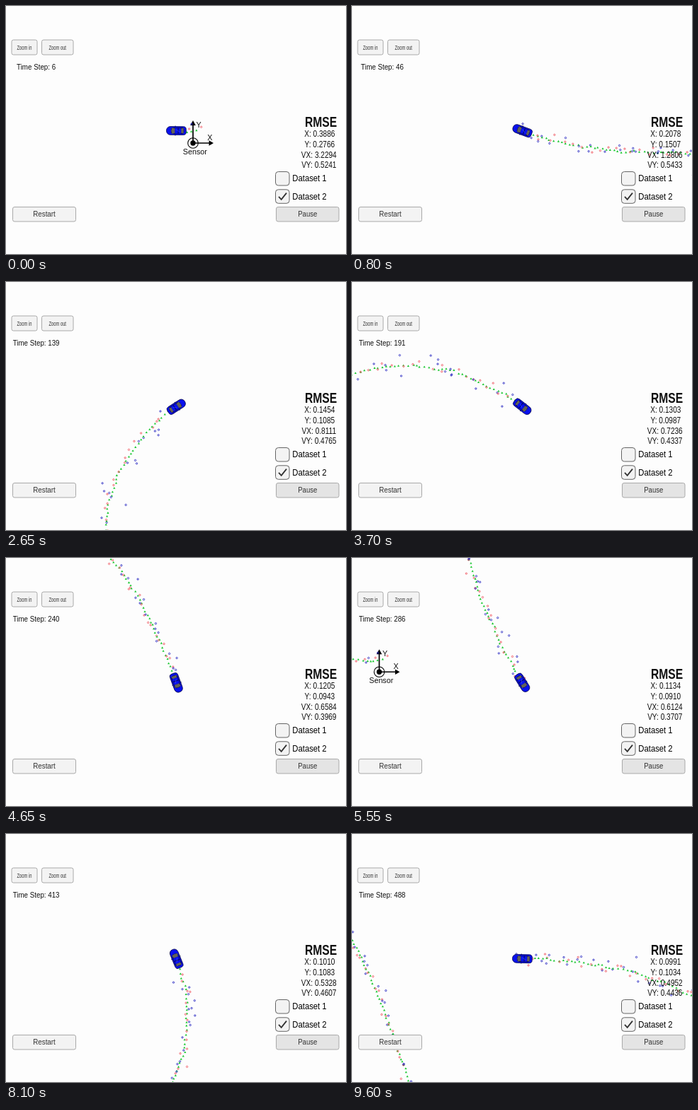
Animation of 480x351 px, one loop 9.65 s. Source, as an HTML page with a canvas:

```html
<!DOCTYPE html>
<html lang="en">
<head>
<meta charset="utf-8">
<title>Tracking simulator</title>
<style>
  html, body { margin: 0; width: 100%; height: 100%; overflow: hidden; background: #fdfdfd; }
  canvas { display: block; }
</style>
</head>
<body>
<canvas id="stage" width="480" height="351"></canvas>
<script>
const ctx = document.getElementById('stage').getContext('2d');
const TAU = Math.PI * 2;
const LOOP = 9650, TICK = 50, STEPS = 500;
const CAR = { x: 240.5, y: 176.5 };
const FONT = '"Liberation Sans", Arial, sans-serif';

// tick -> time step
const CLOCK = [[0, 6], [74, 191], [111, 286], [134, 343], [192, 488]];

// time step -> X, Y, VX, VY errors
const RMSE = [
  [6, 0.3886, 0.2766, 3.2294, 0.5241],
  [86, 0.1715, 0.1251, 0.9639, 0.5493],
  [191, 0.1303, 0.0987, 0.7236, 0.4337],
  [286, 0.1134, 0.0910, 0.6124, 0.3707],
  [343, 0.1064, 0.1011, 0.5669, 0.4220],
  [413, 0.1010, 0.1083, 0.5328, 0.4607],
  [488, 0.0991, 0.1034, 0.4952, 0.4436]
];

let seed = 20;
function random() {
  seed = (seed + 0x6D2B79F5) | 0;
  let r = Math.imul(seed ^ (seed >>> 15), 1 | seed);
  r = (r + Math.imul(r ^ (r >>> 7), 61 | r)) ^ r;
  return ((r ^ (r >>> 14)) >>> 0) / 4294967296;
}
function gauss(sigma) {
  return sigma * (random() + random() + random() + random() - 2) * 1.73;
}

function segment(table, value) {
  let i = 0;
  while (i < table.length - 2 && value >= table[i + 1][0]) i++;
  return [table[i], table[i + 1]];
}
function stepAt(tick) {
  const [a, b] = segment(CLOCK, tick);
  return Math.round(a[1] + (b[1] - a[1]) * (tick - a[0]) / (b[0] - a[0]));
}
function errorAt(step, column) {
  const [a, b] = segment(RMSE, step);
  const p = Math.log(step / a[0]) / Math.log(b[0] / a[0]);
  return a[column] * Math.pow(b[column] / a[column], p);
}

// Path around the sensor: sinusoidal turn rate and a slightly varying speed, in pixels
function buildPath() {
  const path = [];
  let x = 0, y = 0;
  for (let k = 0; k <= STEPS; k++) {
    const phase = TAU * k / STEPS;
    const heading = Math.PI - 2.188 * (1 - Math.cos(phase));
    const speed = 5.86 - 0.02 * Math.cos(phase) - 0.1 * Math.cos(2 * phase) + 0.17 * Math.sin(phase);
    path.push({ x, y, heading });
    x += speed * Math.cos(heading);
    y -= speed * Math.sin(heading);
  }
  const start = { x: path[6].x + 23.5, y: path[6].y + 17.5 };
  for (const p of path) { p.x -= start.x; p.y -= start.y; }
  return path;
}

// Lidar and radar take turns; the estimate drifts gently around the path
function buildMarks(path) {
  let ex = 0, ey = -1;
  return path.map((p, k) => {
    ex = ex * 0.6 + gauss(0.9);
    ey = ey * 0.6 + gauss(0.9);
    const mark = { x: p.x + ex, y: p.y + ey, lidar: k % 2 === 1 };
    if (mark.lidar) {
      mark.mx = p.x + gauss(3.4);
      mark.my = p.y + gauss(3.4);
    } else {
      const range = Math.hypot(p.x, p.y) + gauss(6.5);
      const angle = Math.atan2(p.y, p.x) + gauss(0.028);
      mark.mx = range * Math.cos(angle);
      mark.my = range * Math.sin(angle);
    }
    return mark;
  });
}

const path = buildPath();
const marks = buildMarks(path);

function text(str, x, y, size, { color = '#111', squeeze = 0.94, weight = '' } = {}) {
  ctx.save();
  ctx.translate(x, y);
  ctx.scale(squeeze, 1);
  ctx.font = `${weight} ${size}px ${FONT}`;
  ctx.textAlign = 'center';
  ctx.fillStyle = color;
  ctx.fillText(str, 0, 0);
  ctx.restore();
}

function box(x, y, w, h, r, fill, stroke, line = 1) {
  ctx.beginPath();
  ctx.roundRect(x, y, w, h, r);
  ctx.fillStyle = fill;
  ctx.fill();
  if (stroke) {
    ctx.strokeStyle = stroke;
    ctx.lineWidth = line;
    ctx.stroke();
  }
}

function poly(points, fill) {
  ctx.beginPath();
  points.forEach(([x, y]) => ctx.lineTo(x, y));
  ctx.closePath();
  ctx.fillStyle = fill;
  ctx.fill();
}

function ring(x, y, r, color, line) {
  ctx.beginPath();
  ctx.arc(x, y, r, 0, TAU);
  ctx.strokeStyle = color;
  ctx.lineWidth = line;
  ctx.stroke();
}

function drawSensor(x, y) {
  ctx.save();
  ctx.translate(x, y);
  ring(0, 0, 7.3, '#000', 1.1);
  ctx.beginPath();
  ctx.arc(0, 0, 3.7, 0, TAU);
  ctx.fillStyle = '#000';
  ctx.fill();
  ctx.beginPath();
  ctx.moveTo(0, -27);
  ctx.lineTo(0, 0);
  ctx.lineTo(24, 0);
  ctx.lineWidth = 1.7;
  ctx.stroke();
  poly([[0, -32], [3.8, -25], [-3.8, -25]], '#000');
  poly([[29, 0], [22.5, -3.7], [22.5, 3.7]], '#000');
  text('Y', 8, -22, 11.4);
  text('X', 23.7, -4, 11.4);
  text('Sensor', 2.8, 16, 11.4);
  ctx.restore();
}

function drawTrail(step) {
  for (let k = 1; k <= step; k++) {
    const m = marks[k];
    poly([[m.x, m.y - 1.6], [m.x + 1.6, m.y + 1.2], [m.x - 1.6, m.y + 1.2]], '#1cc832');
    ring(m.mx, m.my, 1.15, m.lidar ? '#f0505a' : '#2020c0', 0.85);
  }
}

// Drawn pointing along +x
function drawCar(heading) {
  ctx.save();
  ctx.translate(CAR.x, CAR.y);
  ctx.rotate(-heading);
  box(0.8, -7, 1.4, 14, 0.7, '#0a0a50');
  box(-13.8, -5.9, 27.8, 11.8, [4, 5.5, 5.5, 4], '#0810ee', '#06064a', 0.8);
  box(-10.8, -4.5, 18.2, 9, 3, '#0a0a48');
  box(-7.2, -3.9, 9.6, 7.8, 1.5, '#0810ee');
  poly([[2.2, -3.4], [6.3, -4.2], [7.2, 0], [6.3, 4.2], [2.2, 3.4]], '#62625a');
  poly([[-6.8, -3.2], [-10.2, -3.8], [-10.2, 3.8], [-6.8, 3.2]], '#62625a');
  poly([[-3, -4.5], [-2.2, -4.5], [-2.2, 4.5], [-3, 4.5]], '#06063a');
  poly([[-5.5, -1.6], [-4.5, -1.6], [1, 1.4], [0, 1.6]], '#4a5ae8');
  ctx.restore();
}

function drawButton(label, x, y, w, h, size, squeeze, fill = '#f3f3f3') {
  box(x, y, w, h, 2.5, fill, '#a9a9a9');
  text(label, x + w / 2, y + h / 2 + size * 0.36, size, { color: '#323232', squeeze });
}

function drawToggle(label, y, on) {
  box(380.5, y, 19.5, 19.5, 4, '#f3f3f3', '#646464');
  text(label, 428.5, y + 13.8, 12, { color: '#000' });
  if (!on) return;
  ctx.beginPath();
  ctx.moveTo(385, y + 10);
  ctx.lineTo(388.7, y + 14);
  ctx.lineTo(396, y + 4.8);
  ctx.strokeStyle = '#323232';
  ctx.lineWidth = 1.8;
  ctx.stroke();
}

function drawPanel(step) {
  text('Time Step: ' + step, 42.6, 90, 10.4);
  drawButton('Zoom in', 8, 48, 36, 21, 9.8, 0.59);
  drawButton('Zoom out', 50.5, 48, 44.5, 21, 9.8, 0.59);
  drawButton('Restart', 9.5, 284.5, 89, 20.5, 10.4, 0.94);
  drawButton('Pause', 381.5, 284.5, 88.5, 20.5, 10.2, 0.94, '#e4e4e4');
  text('RMSE', 444.5, 171, 20.6, { squeeze: 0.76, weight: 'bold' });
  ['X', 'Y', 'VX', 'VY'].forEach((name, i) => {
    const y = [185.4, 199.9, 214.9, 228.7][i];
    text(`${name}: ${errorAt(step, i + 1).toFixed(4)}`, i < 2 ? 442.8 : 441.8, y, 13, { squeeze: 0.775 });
  });
  drawToggle('Dataset 1', 234.5, false);
  drawToggle('Dataset 2', 259.8, true);
}

function draw(tick) {
  const step = stepAt(tick);
  const car = path[step];
  ctx.fillStyle = '#fdfdfd';
  ctx.fillRect(0, 0, 480, 351);
  ctx.save();
  ctx.translate(CAR.x - car.x, CAR.y - car.y);
  drawSensor(0, 0);
  drawTrail(step);
  ctx.restore();
  drawCar(car.heading);
  drawPanel(step);
}

const origin = performance.now();
let shown = -1;
function frame() {
  const tick = Math.floor(((performance.now() - origin) % LOOP) / TICK);
  if (tick !== shown) draw(shown = tick);
  requestAnimationFrame(frame);
}
frame();
</script>
</body>
</html>
```
